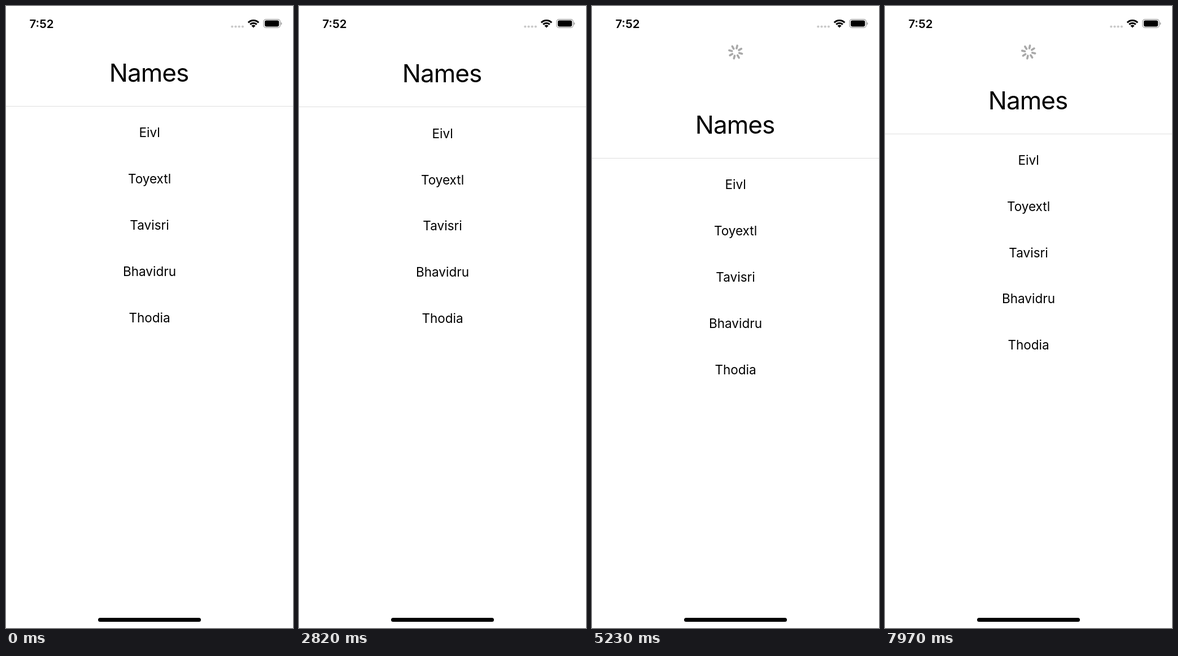
Write an HTML page with a canvas that moves like this. It is 508 by 1101 pixels and loops after 8 s.

```html
<!DOCTYPE html>
<html lang="en">
<head>
<meta charset="utf-8">
<title>Pull to refresh</title>
<style>
  html, body { margin: 0; width: 100%; height: 100%; overflow: hidden; background: #fff; }
  canvas { display: block; width: 508px; height: 1101px; }
</style>
</head>
<body>
<canvas id="stage"></canvas>
<script>
const W = 508, H = 1101, LOOP = 8000;
const FONT = 'Inter, "Liberation Sans", sans-serif';
const ROWS = ['Eivl', 'Toyextl', 'Tavisri', 'Bhavidru', 'Thodia'];

const REST = 48.5;      // list offset while refreshing
const PULL = 94;        // first, short pull
const LONG_PULL = 125;  // second pull, starts the refresh
const INSET = 81;       // extra jump when the refresh starts
const REFRESH = 4510;

// Screen updates: phase start and interval in ms
const PHASES = [[0, 1270], [1270, 114], [2380, 110], [2820, 840], [3660, 120], [4620, 101.4]];

const canvas = document.getElementById('stage');
const ctx = canvas.getContext('2d');
const dpr = window.devicePixelRatio || 1;
canvas.width = W * dpr;
canvas.height = H * dpr;

const clamp = (v, lo, hi) => Math.min(hi, Math.max(lo, v));

function ease(t, from, to) {
  const u = clamp((t - from) / (to - from), 0, 1);
  return u * u * (3 - 2 * u);
}

// Critically damped return after release
function settle(dist, ms) {
  const k = 11.2 * ms / 1000;
  return dist * (1 + k) * Math.exp(-k);
}

function snap(t) {
  const [from, step] = PHASES.findLast(phase => phase[0] <= t);
  return t - (t - from) % step;
}

function scrollAt(t) {
  if (t < 1270) return 0;
  if (t < 2270) return PULL * ease(t, 1180, 2032);
  if (t < 3600) return settle(PULL, t - 2270);
  if (t < 5000) return LONG_PULL * ease(t, 3585, 4666) + INSET * ease(t, REFRESH, 4900);
  return REST + settle(LONG_PULL + INSET - REST, t - 5000);
}

function text(str, x, y, size, weight = 400, align = 'center', spacing = 0) {
  ctx.font = `${weight} ${size}px ${FONT}`;
  ctx.textAlign = align;
  ctx.letterSpacing = spacing + 'px';
  ctx.fillText(str, x, y);
}

function pill(x, y, w, h, r) {
  ctx.beginPath();
  ctx.roundRect(x, y, w, h, r);
}

function wifi(x, y) {
  const a = Math.PI / 4, up = -Math.PI / 2;
  ctx.lineWidth = 3.1;
  ctx.lineCap = 'butt';
  for (const r of [13, 8.2]) {
    ctx.beginPath();
    ctx.arc(x, y, r, up - a, up + a);
    ctx.stroke();
  }
  ctx.beginPath();
  ctx.moveTo(x, y);
  ctx.arc(x, y, 5, up - a, up + a);
  ctx.fill();
}

function battery() {
  ctx.strokeStyle = '#999';
  ctx.lineWidth = 1.2;
  pill(455.9, 23.6, 29.4, 14.8, 4.4);
  ctx.stroke();
  ctx.fillStyle = '#000';
  pill(458, 25.6, 25.2, 10.8, 2.8);
  ctx.fill();
  ctx.fillStyle = '#999';
  pill(486.6, 28.7, 1.7, 4.8, [0, 1.7, 1.7, 0]);
  ctx.fill();
}

function statusBar() {
  ctx.fillStyle = ctx.strokeStyle = '#000';
  text('7:52', 41.5, 38.5, 20.5, 600, 'left');
  wifi(438, 38.5);
  ctx.fillStyle = '#c9c9c9';
  for (let i = 0; i < 4; i++) {
    ctx.beginPath();
    ctx.arc(400.3 + i * 6.2, 36.5, 2.1, 0, 7);
    ctx.fill();
  }
  battery();
}

function spinner(t, scroll) {
  const spokes = t >= REFRESH ? 8 : clamp(Math.floor(scroll / 16.3), 0, 8);
  const degrees = Math.max(0, t - 4588) * 0.1633;
  ctx.save();
  ctx.translate(254.2, 81.5);
  ctx.rotate(degrees * Math.PI / 180);
  ctx.strokeStyle = '#a9a9a9';
  ctx.lineWidth = 3.6;
  ctx.lineCap = 'round';
  for (let i = 0; i < spokes; i++) {
    ctx.beginPath();
    ctx.moveTo(0, -6.7);
    ctx.lineTo(0, -11.7);
    ctx.stroke();
    ctx.rotate(Math.PI / 4);
  }
  ctx.restore();
}

function list(scroll) {
  ctx.fillStyle = '#000';
  text('Names', 253, 134 + scroll, 44, 400, 'center', -1);
  ROWS.forEach((name, i) => text(name, 254, 232.4 + i * 81.8 + scroll, 22.5));
  ctx.fillStyle = '#dedede';
  ctx.fillRect(0, Math.round(177 + scroll), W, 1);
}

function draw(t) {
  const scroll = scrollAt(t);
  ctx.setTransform(dpr, 0, 0, dpr, 0, 0);
  ctx.fillStyle = '#fff';
  ctx.fillRect(0, 0, W, H);
  spinner(t, scroll);
  list(scroll);
  statusBar();
  ctx.fillStyle = '#000';
  pill(163, 1083, 182, 7, 3.5);
  ctx.fill();
}

const start = performance.now();
function loop() {
  draw(snap((performance.now() - start) % LOOP));
  requestAnimationFrame(loop);
}
loop();
</script>
</body>
</html>
```
